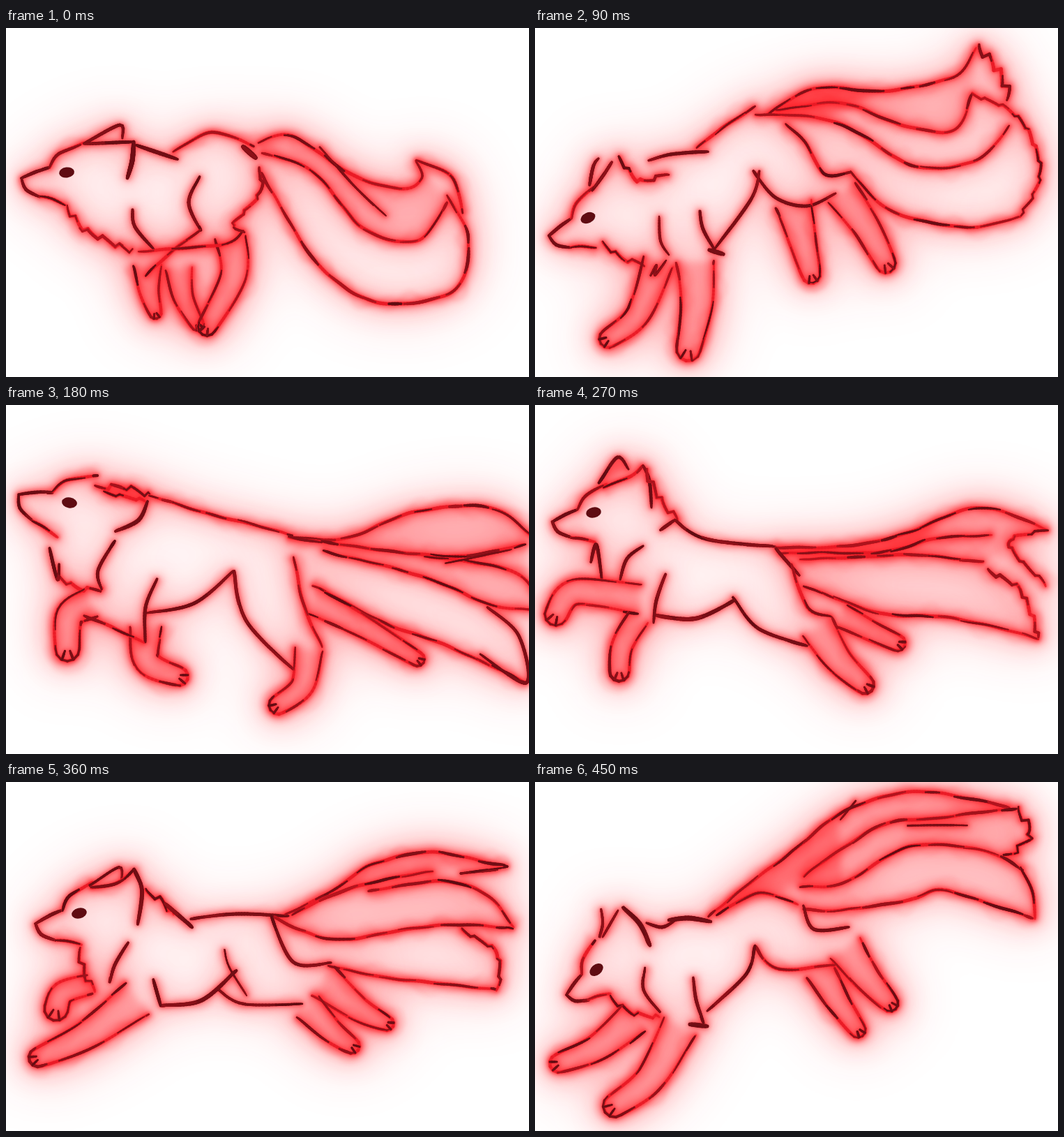
Recreate the animation shown at these times as an HTML page with a canvas. Size 750 by 500 pixels, loop 540 ms.

```html
<!DOCTYPE html>
<html lang="en">
<head>
<meta charset="utf-8">
<title>Running fox</title>
<style>
html, body { margin: 0; width: 100%; height: 100%; overflow: hidden; background: #fff; }
canvas { display: block; }
</style>
</head>
<body>
<canvas id="stage" width="750" height="500"></canvas>
<script>
const W = 750, H = 500, PAD = 80, STEP = 90, TAU = Math.PI * 2;
const view = document.getElementById('stage').getContext('2d');

let strokes, fills, eyes, seed;
const rnd = () => (seed = (seed * 16807) % 2147483647) / 2147483647;
const span = (a, b) => a + (b - a) * rnd();

// Catmull-Rom through a flat list of coordinates, one sample about every 4 px
function curve(p) {
  const n = p.length / 2, out = [];
  const at = i => { i = Math.max(0, Math.min(n - 1, i)); return [p[2 * i], p[2 * i + 1]]; };
  for (let i = 0; i < n - 1; i++) {
    const a = at(i - 1), b = at(i), c = at(i + 1), d = at(i + 2);
    const steps = Math.max(2, Math.round(Math.hypot(c[0] - b[0], c[1] - b[1]) / 4));
    for (let s = 0; s < steps; s++) {
      const t = s / steps;
      out.push([0, 1].map(k => b[k] + 0.5 * t * (c[k] - a[k] +
        t * (2 * a[k] - 5 * b[k] + 4 * c[k] - d[k] + t * (3 * (b[k] - c[k]) + d[k] - a[k])))));
    }
  }
  out.push(at(n - 1));
  return out;
}

// Moves every point sideways by off(i)
const shift = (pts, off) => pts.map(([x, y], i) => {
  const a = pts[Math.max(0, i - 1)], b = pts[Math.min(pts.length - 1, i + 1)];
  const dx = b[0] - a[0], dy = b[1] - a[1], k = off(i) / (Math.hypot(dx, dy) || 1);
  return [x - dy * k, y + dx * k];
});

function sway(amp) {
  const p = span(0, TAU), q = span(0, TAU);
  return i => amp * (0.6 * Math.sin(i * 0.19 + p) + 0.4 * Math.sin(i * 0.53 + q));
}

function add(pts, w, dark) {
  strokes.push({ pts, w, dark });
  return pts;
}

// Solid dark stroke
const ink = (w, ...p) => add(curve(p), w, true);

// Red contour with ragged teeth and scattered dark marks
function fur(jag, ...p) {
  const wave = sway(1);
  return add(shift(curve(p), i => wave(i) + jag * ((i % 6) / 3 - 1)), 5, false);
}

const haze = (alpha, a, b = []) => fills.push({ alpha, pts: [...a, ...[...b].reverse()] });

// Limb around a three-point spine, closed by a round paw with two toes
function leg(w0, w1, ...spine) {
  const mid = curve(spine), n = mid.length - 1;
  const side = s => shift(mid, i => s * (w0 + (w1 - w0) * i / n) / 2);
  const left = side(1), right = side(-1), [x, y] = mid[n], r = w1 / 2;
  const dir = Math.atan2(y - mid[n - 2][1], x - mid[n - 2][0]);
  const rim = (a, k) => [x + Math.cos(dir + a) * r * k, y + Math.sin(dir + a) * r * k];
  const cap = [1.1, 0.55, 0, -0.55, -1.1].map(a => rim(a, 1));
  add([...left, ...cap, ...right.reverse()], 4.5, false);
  for (const a of [0.5, -0.5]) ink(3.5, ...rim(a, 1), ...rim(a * 2, 0.25));
  haze(0.26, left, right.reverse());
}

// Muzzle, brow and jaw, measured in units of the distance from nose to eye
function head(nx, ny, ex, ey) {
  const dx = ex - nx, dy = ey - ny;
  const place = (...p) => p.flatMap((u, i) => i % 2 ? [] :
    [nx + u * dx - p[i + 1] * dy, ny + u * dy + p[i + 1] * dx]);
  ink(5, ...place(0, 0, 0.35, -0.1, 0.64, -0.15));
  fur(0, ...place(0.64, -0.15, 0.88, -0.43, 1.45, -0.6));
  ink(5, ...place(0, 0, 0.07, 0.26, 0.35, 0.46));
  fur(0, ...place(0.35, 0.46, 0.6, 0.54, 0.88, 0.7));
  eyes.push([ex, ey, Math.atan2(dy, dx)]);
}

function layer() {
  const c = document.createElement('canvas');
  c.width = W + 2 * PAD; c.height = H + 2 * PAD;
  const g = c.getContext('2d');
  g.translate(PAD, PAD);
  g.lineCap = g.lineJoin = 'round';
  g.strokeStyle = g.fillStyle = '#ff1c24';
  return g;
}

function trace(g, pts) {
  g.beginPath();
  pts.forEach(([x, y]) => g.lineTo(x, y));
}

function blurred(g, blur, alpha, paint) {
  const l = layer();
  paint(l);
  g.filter = `blur(${blur}px)`;
  g.globalAlpha = alpha;
  g.drawImage(l.canvas, -PAD, -PAD);
  g.filter = 'none';
  g.globalAlpha = 1;
}

const halo = (g, width, blur, alpha) => blurred(g, blur, alpha, l => {
  for (const s of strokes) {
    l.lineWidth = s.dark ? width * 0.7 : width;
    trace(l, s.pts);
    l.stroke();
  }
});

// Thin wavering copies of the contours
function smoke(l) {
  for (const s of strokes) {
    for (let k = 1; k < 6; k++) {
      l.globalAlpha = 0.4 / k;
      l.lineWidth = 2 + k;
      trace(l, shift(s.pts, sway((s.dark ? 2 : 3.5) * k)));
      l.stroke();
    }
  }
}

function dash(g, pts, w, rgb) {
  const n = pts.length - 1;
  g.strokeStyle = rgb;
  for (let i = 0; i < n; i++) {
    g.lineWidth = w * (0.45 + 0.55 * Math.sqrt(Math.sin(Math.PI * (i + 0.5) / n)));
    trace(g, [pts[i], pts[i + 1]]);
    g.stroke();
  }
}

const maroon = k => `rgb(${95 + 100 * k},${12 + 10 * k},${18 + 14 * k})`;

function brush(g, { pts, w, dark }) {
  dash(g, pts, w, dark ? maroon(0.25) : 'rgba(232,26,36,.75)');
  for (let i = 0; i < pts.length - 2;) {
    const len = Math.round(span(5, 16)), tilt = span(-0.25, 0.25);
    const part = shift(pts.slice(i, i + len), j => tilt * (j - len / 2));
    if (part.length > 2) dash(g, part, w * span(0.55, 1), maroon(rnd() * (dark ? 0.5 : 0.9)));
    i += len + Math.round(span(-2, dark ? 2 : 6));
  }
}

function render(pose, i) {
  strokes = []; fills = []; eyes = []; seed = 71 + i * 977;
  pose();
  const g = layer();
  g.fillStyle = '#fff';
  g.fillRect(-PAD, -PAD, W + 2 * PAD, H + 2 * PAD);
  halo(g, 32, 40, 0.26);
  halo(g, 22, 18, 0.3);
  blurred(g, 6, 1, l => fills.forEach(f => {
    l.globalAlpha = f.alpha;
    trace(l, f.pts);
    l.fill();
  }));
  halo(g, 13, 7, 0.55);
  blurred(g, 3, 0.75, smoke);
  halo(g, 6, 2.5, 0.65);
  strokes.forEach(s => brush(g, s));
  g.fillStyle = maroon(0);
  for (const [x, y, turn] of eyes) {
    g.beginPath();
    g.ellipse(x, y, 11, 7.5, turn, 0, TAU);
    g.fill();
  }
  return g.canvas;
}

function gather() {
  head(22, 215, 87, 207);
  ink(5, 112, 166, 163, 139, 167, 158);
  ink(5, 112, 166, 184, 163);
  ink(7, 183, 163, 181, 190, 174, 215);
  ink(6, 187, 168, 246, 188);
  fur(0, 240, 178, 295, 149, 355, 170);
  ink(8, 340, 170, 358, 186);
  fur(4, 85, 256, 115, 291, 180, 320);
  ink(5, 181, 260, 185, 285, 212, 317);
  ink(5, 278, 213, 262, 250, 279, 290);
  fur(0, 279, 290, 235, 322, 200, 355);
  leg(40, 17, 203, 340, 205, 375, 214, 408);
  leg(38, 18, 248, 345, 254, 385, 274, 424);
  leg(44, 26, 322, 300, 326, 355, 288, 428);
  fur(0, 190, 320, 310, 310, 340, 290);
  fur(2, 362, 200, 365, 235, 325, 282, 342, 292);
  const top = fur(0, 362, 165, 410, 154, 495, 210, 570, 230, 597, 215, 588, 190);
  const mid = fur(0, 367, 180, 440, 205, 510, 285, 590, 305, 632, 250);
  fur(0, 366, 208, 445, 335, 530, 392, 640, 378, 663, 300, 632, 240);
  fur(0, 588, 190, 640, 214, 655, 265);
  ink(3, 450, 170, 495, 222, 545, 269);
  haze(0.2, top, mid);
}

function land() {
  head(20, 298, 76, 272);
  ink(5, 78, 225, 84, 197, 91, 187);
  ink(5, 110, 192, 100, 208, 82, 233);
  fur(3, 119, 185, 150, 220, 191, 208);
  fur(3, 95, 308, 125, 330, 157, 340);
  ink(5, 163, 190, 195, 181, 248, 177);
  fur(0, 232, 172, 265, 145, 316, 113);
  const top = fur(0, 332, 124, 400, 87, 500, 90, 600, 70, 632, 28);
  fur(6, 632, 28, 662, 58, 681, 102);
  const mid = fur(0, 345, 118, 440, 108, 530, 140, 600, 147, 626, 95);
  const low = fur(0, 316, 124, 430, 134, 540, 196, 630, 191, 680, 140);
  fur(0, 452, 206, 515, 264, 620, 285, 696, 271);
  fur(2, 626, 95, 695, 130, 724, 205, 696, 271);
  haze(0.5, top.slice(0, 44), low.slice(0, 26));
  haze(0.18, top, mid);
  fur(0, 360, 137, 388, 165, 414, 209, 452, 206);
  ink(5, 313, 205, 345, 243, 390, 255, 431, 237);
  leg(52, 26, 371, 252, 385, 310, 396, 353);
  leg(48, 28, 440, 236, 475, 285, 503, 337);
  ink(5, 322, 205, 310, 245, 258, 316);
  ink(5, 236, 262, 241, 288, 257, 317);
  ink(7, 250, 318, 270, 324);
  ink(4, 178, 270, 180, 305, 192, 325);
  ink(4, 166, 355, 174, 340, 172, 354, 188, 333);
  leg(54, 34, 230, 335, 232, 395, 220, 460);
  leg(44, 26, 177, 335, 148, 410, 105, 445);
}

function lift() {
  head(18, 128, 91, 140);
  fur(3, 72, 245, 100, 261, 138, 265);
  ink(5, 62, 205, 74, 250, 76, 228);
  ink(5, 137, 264, 132, 237, 156, 195);
  haze(0.6, fur(4, 128, 119, 165, 118, 205, 130), fur(2, 140, 126, 200, 138));
  ink(6, 203, 138, 190, 165, 157, 181);
  fur(0, 205, 130, 300, 158, 411, 186);
  const top = fur(0, 412, 190, 490, 190, 590, 152, 698, 148, 756, 190);
  const mid = fur(0, 405, 190, 520, 205, 640, 217, 745, 200);
  const low = fur(0, 455, 209, 605, 248, 690, 285, 756, 293);
  fur(0, 440, 258, 545, 313, 640, 348, 746, 398);
  fur(0, 600, 217, 720, 235, 760, 270);
  ink(5, 690, 290, 735, 330, 746, 398, 680, 357);
  ink(3, 630, 227, 725, 207);
  haze(0.22, top, mid);
  haze(0.15, mid, low);
  leg(40, 20, 440, 280, 520, 322, 590, 364);
  fur(0, 412, 218, 428, 288, 453, 347);
  ink(5, 326, 238, 345, 310, 413, 380);
  leg(40, 26, 434, 350, 425, 402, 390, 430);
  ink(5, 326, 238, 270, 284, 202, 298);
  ink(5, 217, 249, 200, 290, 200, 340);
  leg(46, 26, 200, 318, 203, 368, 248, 389);
  leg(42, 34, 122, 284, 91, 302, 88, 350);
  fur(0, 112, 302, 150, 318, 198, 340);
}

function leap() {
  head(25, 167, 84, 154);
  haze(0.6, ink(5, 92, 112, 118, 75, 134, 92));
  fur(0, 98, 118, 138, 102, 155, 87);
  ink(5, 155, 87, 164, 108, 167, 147);
  fur(4, 158, 93, 180, 138, 205, 165);
  ink(5, 180, 179, 200, 165);
  ink(5, 200, 165, 245, 192, 345, 203);
  ink(5, 80, 225, 88, 200, 96, 250);
  ink(5, 122, 250, 132, 220, 155, 202);
  const top = fur(0, 345, 203, 430, 204, 530, 185, 633, 147, 735, 178);
  const mid = fur(0, 350, 212, 500, 210, 580, 190, 655, 187);
  const low = fur(0, 380, 222, 540, 215, 643, 225);
  const base = fur(0, 385, 260, 500, 299, 600, 305, 722, 335);
  fur(2, 735, 178, 680, 198, 733, 259);
  fur(3, 648, 238, 695, 265, 722, 335);
  haze(0.5, top.slice(0, 62), mid.slice(0, 52));
  haze(0.2, top, low);
  haze(0.1, low, base);
  ink(5, 345, 206, 379, 244);
  fur(0, 368, 228, 390, 290, 425, 303);
  ink(5, 284, 275, 320, 320, 390, 345);
  leg(50, 26, 405, 318, 435, 365, 473, 401);
  leg(34, 22, 440, 302, 485, 325, 520, 341);
  ink(6, 286, 280, 230, 306, 172, 301);
  ink(5, 187, 242, 174, 280, 170, 312);
  leg(42, 32, 150, 278, 58, 268, 30, 300);
  leg(32, 28, 148, 304, 125, 345, 121, 382);
}

function stretch() {
  head(42, 203, 105, 188);
  ink(4, 120, 149, 162, 122, 166, 141);
  fur(0, 122, 152, 155, 146, 184, 125);
  ink(6, 183, 125, 195, 155, 189, 204);
  fur(4, 104, 238, 112, 275, 128, 300);
  ink(5, 175, 230, 156, 262, 149, 287);
  fur(4, 198, 157, 222, 170, 240, 190);
  ink(6, 228, 174, 267, 208);
  ink(5, 265, 196, 330, 189, 405, 192);
  const top = fur(0, 400, 190, 475, 152, 525, 118, 610, 101, 719, 121);
  const mid = fur(0, 410, 190, 500, 150, 612, 128);
  fur(0, 520, 157, 620, 142, 690, 162, 728, 208);
  const low = fur(0, 385, 193, 425, 214, 490, 225, 620, 205, 727, 210);
  fur(0, 462, 264, 560, 282, 703, 297);
  fur(2, 652, 212, 703, 245, 705, 299);
  ink(3, 719, 122, 652, 131, 705, 126);
  haze(0.28, top, mid);
  haze(0.1, mid, low);
  ink(5, 380, 192, 412, 258, 466, 259);
  leg(52, 20, 455, 285, 505, 325, 546, 346);
  leg(44, 22, 433, 322, 465, 355, 496, 378);
  ink(4, 305, 297, 340, 318, 425, 318);
  ink(3, 313, 240, 320, 265, 345, 306);
  ink(6, 330, 270, 280, 313, 222, 320);
  ink(5, 222, 320, 211, 283);
  leg(56, 26, 188, 310, 115, 363, 46, 395);
  leg(28, 34, 120, 290, 82, 302, 72, 325);
}

function reach() {
  head(45, 305, 88, 269);
  ink(4, 92, 222, 97, 203, 95, 182);
  ink(4, 119, 184, 97, 222);
  ink(7, 126, 180, 150, 203, 165, 234);
  fur(3, 106, 308, 135, 330, 178, 338);
  ink(4, 158, 266, 156, 298, 179, 330);
  ink(5, 160, 202, 182, 208, 200, 199);
  ink(7, 192, 198, 220, 195, 252, 200);
  const top = fur(0, 248, 192, 370, 98, 455, 36, 560, 14, 680, 37);
  const mid = fur(0, 385, 135, 490, 65, 580, 51, 690, 38);
  const low = fur(0, 380, 150, 440, 145, 540, 92, 640, 98, 700, 125);
  const base = fur(0, 385, 182, 440, 184, 540, 168, 590, 156, 715, 196);
  fur(5, 690, 38, 710, 76, 674, 107);
  fur(0, 697, 122, 714, 160, 716, 196);
  ink(3, 534, 62, 620, 62);
  ink(3, 438, 54, 460, 27);
  haze(0.35, top.slice(0, 60), low.slice(0, 16));
  haze(0.22, top, mid);
  haze(0.18, mid, low);
  haze(0.12, low, base);
  fur(0, 260, 190, 320, 160, 377, 175);
  ink(5, 385, 177, 400, 211, 450, 208);
  leg(52, 24, 445, 238, 475, 280, 509, 317);
  leg(44, 22, 408, 270, 435, 315, 463, 355);
  fur(0, 315, 235, 350, 268, 430, 262);
  ink(5, 315, 235, 303, 275, 247, 328);
  ink(5, 227, 280, 231, 312, 242, 345);
  ink(7, 222, 347, 247, 350);
  leg(52, 32, 208, 350, 165, 425, 114, 464);
  leg(50, 26, 142, 338, 90, 380, 34, 403);
}

const poses = [gather, land, lift, leap, stretch, reach].map(render);
const start = performance.now();

function tick() {
  const t = performance.now() - start;
  view.drawImage(poses[Math.floor(t / STEP) % poses.length], -PAD, -PAD);
  requestAnimationFrame(tick);
}
tick();
</script>
</body>
</html>
```
